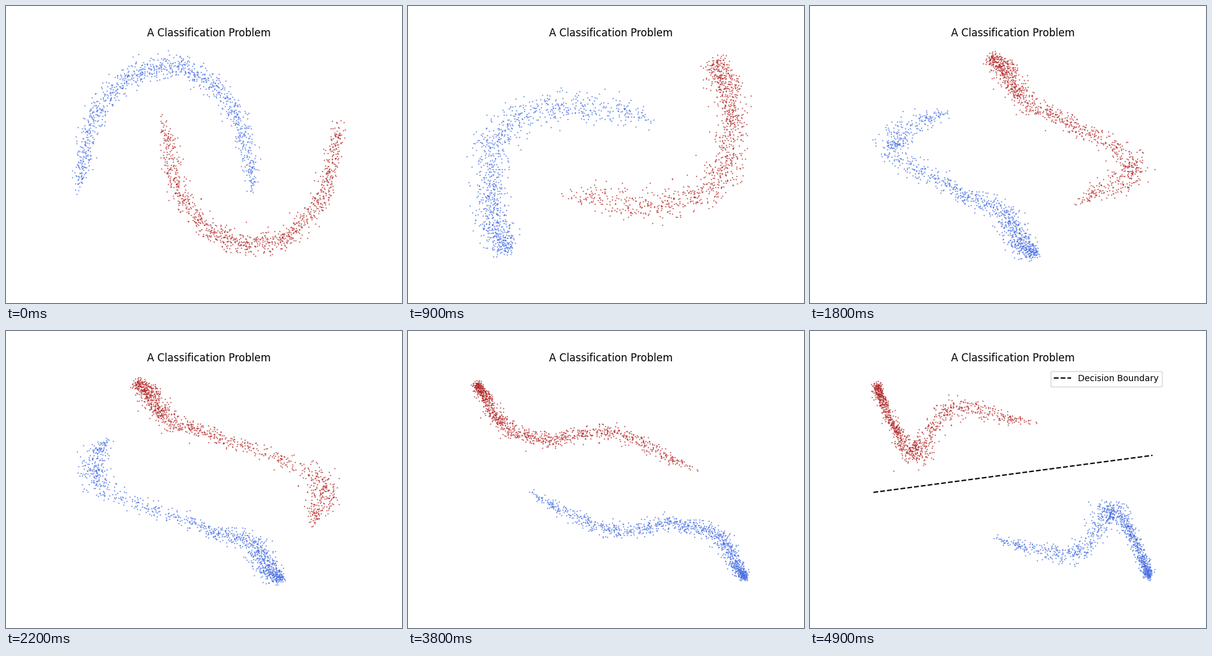
A matplotlib script for the animation above (7 s loop, 640x480 px).

```python
import numpy as np
import matplotlib.pyplot as plt
from matplotlib.animation import FuncAnimation

N = 1000                # points per class
STEPS, FRAMES = 49, 70
CENTER = np.array([327.5, 242.0])
S = np.arange(-0.06, 1.065, 0.01)     # fine parameter along a band

# Blue band's centre line: a half moon first, then a few key poses.
# The red band is always its half-turn about CENTER.
KNOTS = np.linspace(0, 1, 6)
arc = np.pi * KNOTS
KEYS = [0, 9, 14, 22, 30, 49]
POSES = np.array([
    np.column_stack([257.5 - 140 * np.cos(arc), 289 - 192 * np.sin(arc)]),
    [(163, 396), (139, 357), (134, 292), (145, 208), (242, 164), (382, 180)],
    [(283, 401), (252, 380), (232, 328), (155, 272), (128, 205), (275, 168)],
    [(447, 401), (421, 384), (401, 345), (312, 314), (148, 245), (160, 180)],
    [(537, 401), (517, 384), (490, 344), (388, 326), (250, 293), (138, 215)],
    [(548, 399), (538, 370), (513, 318), (480, 287), (430, 358), (310, 338)],
]) - CENTER


def spline(pts):
    """Smooth curve through the knots at S, going on straight past the ends."""
    s = np.clip(S, 0, 1)
    i = np.clip(np.searchsorted(KNOTS, s, "right") - 1, 0, len(KNOTS) - 2)
    u = ((s - KNOTS[i]) / KNOTS[1])[:, None]
    m = np.gradient(pts, axis=0)
    a, b, ma, mb = pts[i], pts[i + 1], m[i], m[i + 1]
    d = b - a
    curve = a + u * (ma + u * (3 * d - 2 * ma - mb + u * (ma + mb - 2 * d)))
    slope = np.where(S[:, None] < 0.5, m[0], m[-1]) / KNOTS[1]
    return curve + slope * (S - s)[:, None]


def extent(curve):
    return np.abs(curve).max(axis=0)


EXTENTS = np.array([extent(spline(p)) for p in POSES])


def centre_line(step):
    k = min(np.searchsorted(KEYS, step, "right") - 1, len(KEYS) - 2)
    f = (step - KEYS[k]) / (KEYS[k + 1] - KEYS[k])
    mix = lambda v: (1 - f) * v[k] + f * v[k + 1]
    curve = spline(mix(POSES))
    return curve * mix(EXTENTS) / extent(curve)     # the view fits the data


def spread(step, heading):
    """Bands are wider where they bend, and narrow as the classes part."""
    base = 4 + 7 * np.exp(-abs(step - 9) / 8)
    turn = np.abs(np.gradient(np.unwrap(heading), S))
    width = base + 0.7 * np.minimum(turn, 16)
    return np.convolve(width, np.ones(21) / 21, "same")


def sample(rng):
    """Position along the band and signed offset across it."""
    along = np.linspace(0, 1, N) + rng.normal(0, 0.016, N)
    return np.clip(along, S[0], S[-1]), np.clip(rng.normal(0, 1, N), -3, 3)


rng = np.random.default_rng(42)
blue, red = sample(rng), sample(rng)
red[0][0], red[1][0] = 0.53, 4.0    # one far outlier


def clouds(step):
    curve = centre_line(step)
    dx, dy = np.gradient(curve, S, axis=0).T
    heading = np.arctan2(dy, dx)
    normal = np.column_stack([-np.sin(heading), np.cos(heading)])
    offset = normal * spread(step, heading)[:, None]

    def place(along, across):
        at = lambda v: np.column_stack([np.interp(along, S, c) for c in v.T])
        return at(curve) + at(offset) * across[:, None]

    return CENTER + place(*blue), CENTER - place(*red)


fig, ax = plt.subplots(figsize=(6.4, 4.8), dpi=100)
ax.set_xlim(80, 576)
ax.set_ylim(427.2, 57.6)
ax.axis("off")
ax.set_title("A Classification Problem", fontsize=12)

dots = [ax.scatter([], [], s=2, color=c, alpha=0.85, linewidths=0)
        for c in ("royalblue", "firebrick")]
line, = ax.plot([102.5, 553.5], [260.8, 201], "k--", lw=1.5,
                label="Decision Boundary")
legend = ax.legend(handles=[line], loc="upper right", fontsize=10)


def update(i):
    for dot, pts in zip(dots, clouds(min(i, STEPS))):
        dot.set_offsets(pts)
    done = i >= STEPS
    line.set_visible(done)
    legend.set_visible(done)
    return [*dots, line, legend]


anim = FuncAnimation(fig, update, frames=FRAMES, interval=100,
                     repeat=True, repeat_delay=0, blit=False)
plt.show()
```
